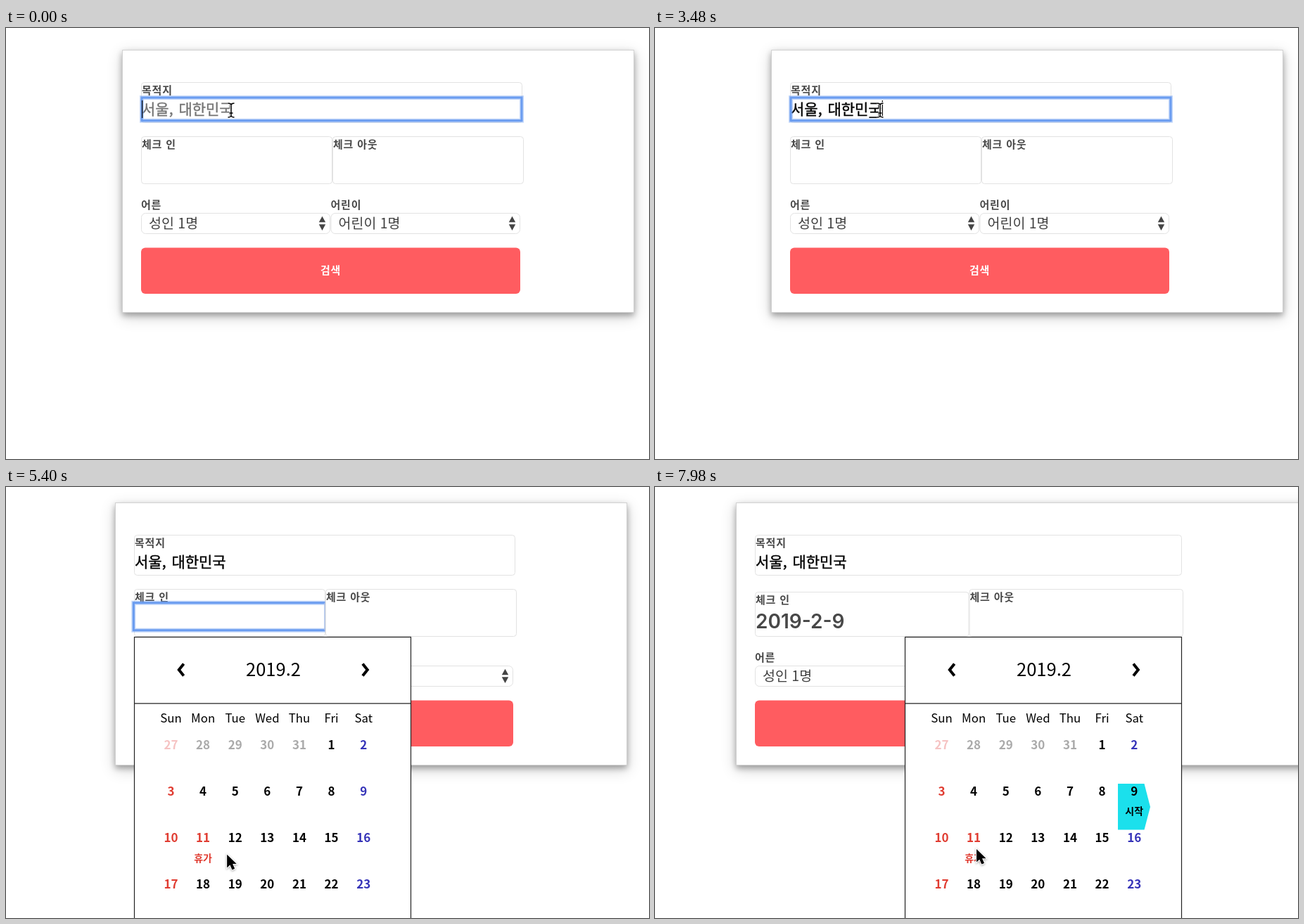
An HTML page that plays this animation: 914 px wide and 613 px high, repeating every 8000 ms.

```html
<!DOCTYPE html>
<html lang="ko">
<head>
<meta charset="utf-8">
<title>Booking form</title>
<style>
  html, body { margin: 0; width: 100%; height: 100%; overflow: hidden; background: #fff; }
  #card {
    position: absolute; top: 31px; height: 374px; box-sizing: border-box;
    border: 1px solid #d2d2d2; background: #fff;
    box-shadow: 0 4px 8px rgba(0,0,0,.3), 0 6px 20px rgba(0,0,0,.19);
  }
  svg { position: absolute; left: 0; top: 0; width: 914px; height: 613px; overflow: hidden; }
  text { font-family: "Noto Sans CJK KR", "Noto Sans CJK", "Noto Sans", sans-serif; white-space: pre; }
  .label { font-size: 15px; font-weight: 700; letter-spacing: .8px; fill: #484848; }
  .input { font-size: 21px; word-spacing: 2px; fill: #000; stroke: #000; stroke-width: .4px; }
  .input.hint { fill: #757575; stroke: #757575; }
  .option { font-size: 19.5px; fill: #404040; }
  .date { font-family: Inter, Roboto, sans-serif; font-size: 28px; font-weight: 600; fill: #484848; }
  .box { fill: #fff; stroke: #e2e2e2; }
  .title { font-size: 25.5px; }
  .week { font-size: 16.8px; }
  .day { font-size: 17px; font-weight: 700; }
  .note { font-size: 14px; font-weight: 700; }
  .mid { text-anchor: middle; }
  .ring path { fill: none; stroke: #6a9cf0; }
</style>
</head>
<body>
<div id="card"></div>
<svg id="stage" viewBox="0 0 914 613"></svg>
<script>
const LOOP = 8000, STEP = 60;
const OPEN = 4140, FOCUS = 3960, PICK = 6360;
const PLACE = "서울, 대한민국";
const stage = document.getElementById("stage");
const card = document.getElementById("card");

function add(parent, tag, attrs = {}, content) {
  const el = document.createElementNS("http://www.w3.org/2000/svg", tag);
  for (const k in attrs) el.setAttribute(k, attrs[k]);
  if (content !== undefined) el.textContent = content;
  parent.appendChild(el);
  return el;
}
const group = (parent, attrs) => add(parent, "g", attrs);
const text = (g, cls, x, y, str, fill) =>
  add(g, "text", fill ? { class: cls, x, y, fill } : { class: cls, x, y }, str);
const box = (g, x, y, w, h, r = 4) =>
  add(g, "rect", { class: "box", x: x + .5, y: y + .5, width: w - 1, height: h - 1, rx: r });
const show = (el, on) => { el.style.display = on ? "" : "none"; };

function select(g, x, w, label) {
  box(g, x, 263, w, 30, 6);
  text(g, "option", x + 11, 284.7, label);
  const ax = x + w - 11.5;
  add(g, "path", { d: `M${ax - 4.7} 276.3h9.4l-4.7-8.6zM${ax - 4.7} 279.3h9.4l-4.7 8.6z`, fill: "#444" });
}

// The form; the date-filled state is wider and its check-in box sits lower.
function form(wide, drop, filled) {
  const g = group(stage), x = 192, half = 272 + wide / 2, bw = 539 + wide;
  box(g, x, 77, 542 + wide, 58);
  text(g, "label", 193, 93.7, "목적지");
  const typed = text(g, "input", 193, 122.8, PLACE);
  box(g, x, 154 + drop, half, 68 - drop);
  text(g, "label", 193, 170.7 + drop, "체크 인");
  box(g, x + half, 154, half, 68);
  text(g, "label", x + half + 1, 170.7, "체크 아웃");
  if (filled) text(g, "date", 193, 210.2, filled);
  text(g, "label", 192, 256.7, "어른");
  select(g, x, bw / 2 - .5, "성인 1명");
  text(g, "label", x + bw / 2, 256.7, "어린이");
  select(g, x + bw / 2, bw / 2, "어린이 1명");
  add(g, "rect", { x, y: 312.5, width: bw, height: 65.5, rx: 6, fill: "#ff5c60" });
  text(g, "label mid", x + bw / 2, 350.2, "검색").style.fill = "#fff";
  return { g, typed };
}

function ring(parent, d) {
  const g = group(parent, { class: "ring" });
  add(g, "path", { d, "stroke-width": 6, opacity: .4 });
  add(g, "path", { d, "stroke-width": 3 });
  return g;
}

const plain = form(0, 0), done = form(65, 4, "2019-2-9");
const placeRing = ring(plain.g, "M193 99H733V131.7H193Z");
const dateRing = group(plain.g);
ring(dateRing, "M463.5 173.8H191.3V212.8H463.5");
add(dateRing, "path", { d: "M463 174V213", stroke: "#a9bfe8", "stroke-width": 1.5 });
const caret = add(plain.g, "rect", { y: 103, width: 1.2, height: 25 });
const under = add(plain.g, "rect", { y: 126.3, height: 1.6 });

// Calendar
const cal = group(stage);
add(cal, "rect", { x: 182.5, y: 213.5, width: 393, height: 420, fill: "#fff", stroke: "#222", "stroke-width": 1.2 });
add(cal, "path", { d: "M182.5 307.8H575.5", stroke: "#222", "stroke-width": 1.2 });
text(cal, "title mid", 380, 268.5, "2019.2");
add(cal, "path", {
  d: "M252.6 251.6L245.8 260L252.6 268.4M507 251.6L513.8 260L507 268.4",
  fill: "none", stroke: "#000", "stroke-width": 4
});
const colX = c => 234.5 + c * 45.62;
const rowY = [373.3, 438.8, 505.2, 570.8];
["Sun", "Mon", "Tue", "Wed", "Thu", "Fri", "Sat"].forEach((w, c) => text(cal, "week mid", colX(c), 335.3, w));

const tag = group(cal);
add(tag, "path", { d: "M485 422H522.5L531 455L522.5 487.5H485Z", fill: "#1be0ec" });
text(tag, "note mid", colX(6), 466.3, "시작");
let ninth;
for (let i = 0; i < 28; i++) {
  const c = i % 7, prev = i < 5, n = prev ? 27 + i : i - 4;
  const red = c === 0 || n === 11;
  const fill = prev ? (red ? "#f6c3c3" : "#aaa") : red ? "#e03c31" : c === 6 ? "#3533b8" : "#000";
  const el = text(cal, "day mid", colX(c), rowY[i / 7 | 0], n, fill);
  if (n === 9) ninth = el;
}
text(cal, "note mid", colX(1), 533, "휴가", "#e03c31");

// Pointers
const arrow = group(stage);
arrow.style.filter = "drop-shadow(0 1.5px 1.5px rgba(0,0,0,.35))";
add(arrow, "path", {
  d: "M0 0V18.6L4.3 14.7L7.3 21.6L11 20L8 13.3H13.6Z",
  stroke: "#fff", "stroke-width": 2, "paint-order": "stroke"
});
const beam = group(stage);
const beamPath = "M-4.5-10Q-1-10 0-8Q1-10 4.5-10M0-8V8M-4.5 10Q-1 10 0 8Q1 10 4.5 10M-2.5 4H2.5";
for (const [stroke, w] of [["#fff", 3.4], ["#000", 1.5]])
  add(beam, "path", { d: beamPath, fill: "none", stroke, "stroke-width": w });

const typing = [
  [0, ""], [540, "ㅅ"], [600, "서"], [660, "성"], [720, "서우"], [840, "서울"],
  [1200, "서울,"], [1620, "서울, "], [1980, "서울, ㄷ"], [2040, "서울, 대"],
  [2160, "서울, 댛"], [2280, "서울, 대하"], [2340, "서울, 대한"],
  [2580, "서울, 대한ㅁ"], [2640, "서울, 대한미"], [2700, "서울, 대한민"],
  [2880, "서울, 대한민ㄱ"], [3000, "서울, 대한민구"], [3120, PLACE]
];
const path = [
  [0, 320, 117], [3480, 320, 117], [3900, 286, 206], [4200, 286, 206],
  [4680, 289.5, 489.5], [5040, 292, 533], [5280, 292, 533], [5880, 505, 435],
  [6300, 505, 435], [6420, 508, 435.5], [6900, 508, 435.5],
  [7260, 500, 475], [7620, 472, 540], [7980, 457, 515], [8000, 457, 515]
];

function pointAt(t) {
  const i = Math.max(1, path.findIndex(p => p[0] > t));
  const [t0, x0, y0] = path[i - 1], [t1, x1, y1] = path[i];
  const u = (t - t0) / (t1 - t0), e = u * u * (3 - 2 * u);
  return [x0 + (x1 - x0) * e, y0 + (y1 - y0) * e];
}

function drawInput(t) {
  const value = typing.filter(s => s[0] <= t).pop()[1];
  const el = plain.typed, focused = t < FOCUS;
  el.textContent = value || PLACE;
  el.classList.toggle("hint", !value);
  const width = n => n ? el.getSubStringLength(0, n) : 0;
  const end = 193 + width(value.length);
  caret.setAttribute("x", end);
  caret.setAttribute("opacity", value || t < 300 ? 1 : t < 360 ? .5 : 0);
  const composing = focused && /[ㄱ-ㅎ가-힣]$/.test(value);
  if (composing) {
    const start = 193 + width(value.length - 1);
    under.setAttribute("x", start + 1);
    under.setAttribute("width", end - start - 2);
  }
  show(under, composing);
  show(caret, focused);
  show(placeRing, focused);
  show(dateRing, !focused);
}

function draw(t) {
  const open = t >= OPEN, picked = t >= PICK;
  const dx = picked ? -50 : open ? -10 : 0, dy = open ? -9 : 0;
  const move = `translate(${dx} ${dy})`;
  card.style.left = "165px";
  card.style.width = (picked ? 860 : 728) + "px";
  card.style.transform = `translate(${dx}px, ${dy}px)`;
  plain.g.setAttribute("transform", move);
  done.g.setAttribute("transform", move);
  show(plain.g, !picked);
  show(done.g, picked);
  show(cal, open);
  show(tag, picked);
  cal.setAttribute("transform", `translate(${picked ? 173 : 0} 0)`);
  ninth.setAttribute("fill", picked ? "#000" : "#3533b8");
  if (!picked) drawInput(t);

  const hidden = t >= 540 && t < 3480;
  const overText = t < 3660 || (t >= 5880 && t < PICK);
  const [x, y] = pointAt(t);
  for (const p of [arrow, beam]) p.setAttribute("transform", `translate(${x} ${y})`);
  show(arrow, !hidden && !overText);
  show(beam, !hidden && overText);
}

const begin = performance.now();
function tick() {
  const t = (performance.now() - begin) % LOOP;
  draw(Math.floor(t / STEP) * STEP);
  requestAnimationFrame(tick);
}
tick();
</script>
</body>
</html>
```
